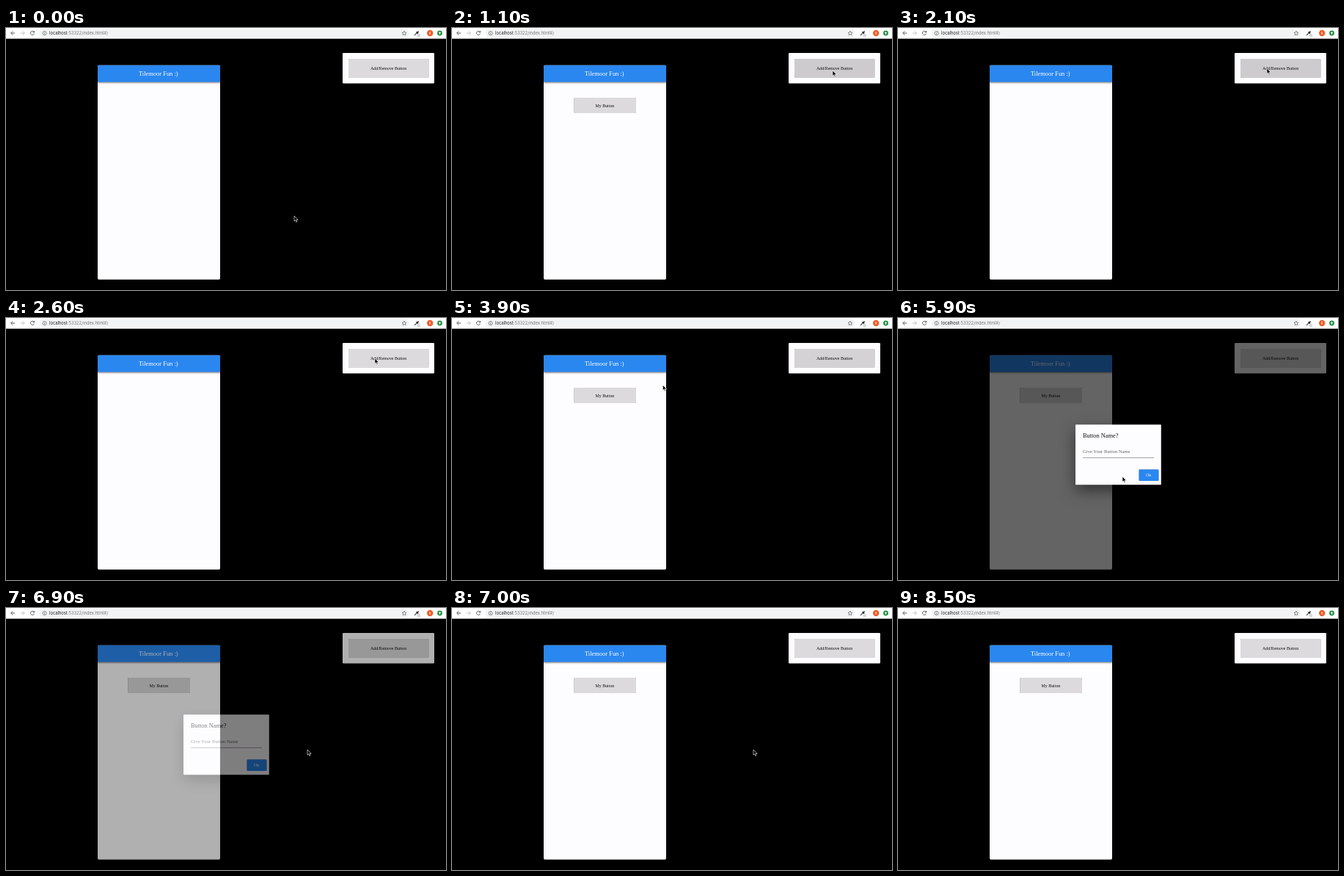
Recreate the animation shown at these times as an HTML page. Size 600 by 357 pixels, loop 9 s.

```html
<!DOCTYPE html>
<html lang="en">
<head>
<meta charset="utf-8">
<title>Add and remove a button</title>
<style>
  html, body { margin: 0; width: 100%; height: 100%; overflow: hidden; background: #000; }
  svg { display: block; width: 100vw; height: 100vh; }
  text { font: 5.93px "Liberation Serif", "Times New Roman", serif; fill: #111; }
  .mid { text-anchor: middle; }
  .url { font: 5.8px Inter, Roboto, sans-serif; fill: #777; }
  .url tspan { fill: #222; }
  .icon { fill: none; stroke: #4a4d51; stroke-width: .9; }
  .raised { filter: drop-shadow(0 .9px .7px rgba(0, 0, 0, .55)); }
  .bar { filter: drop-shadow(0 1.2px 1.2px rgba(0, 0, 0, .55)); }
  .card { filter: drop-shadow(0 8px 10px rgba(0, 0, 0, .5)); }
  .paper { fill: #fdfcfe; }
  .grey { fill: #dcdadc; }
  .blue { fill: #2a87f0; }
</style>
</head>
<body>
<svg viewBox="0 0 600 357" preserveAspectRatio="none">
  <defs>
    <clipPath id="addClip"><rect x="467" y="42" width="109.3" height="26" rx="1.3"/></clipPath>
    <clipPath id="myClip"><rect x="166.5" y="95" width="84.5" height="21" rx="1.3"/></clipPath>
  </defs>
  <rect width="600" height="357"/>

  <!-- Phone -->
  <rect class="paper" x="125" y="50.7" width="167" height="292" rx="1.6"/>
  <path class="blue bar" d="M125 73.5V52.3q0-1.6 1.6-1.6H290.4q1.6 0 1.6 1.6V73.5Z"/>
  <text class="mid" x="207.8" y="65.2" style="font-size:8.45px;fill:#fff">Tilemoor Fun :)</text>
  <g id="mine">
    <rect class="grey raised" x="166.5" y="95" width="84.5" height="21" rx="1.3"/>
    <circle id="myRipple" cx="212" cy="105" clip-path="url(#myClip)"/>
    <text class="mid" x="208.4" y="107.5">My Button</text>
  </g>

  <!-- Control panel -->
  <rect class="paper" x="459" y="34" width="125" height="41.6" rx="1.3"/>
  <rect class="grey raised" x="467" y="42" width="109.3" height="26" rx="1.3"/>
  <circle id="addRipple" cx="519" cy="57" clip-path="url(#addClip)"/>
  <text class="mid" x="521.5" y="56.9">Add/Remove Button</text>

  <!-- Dialog -->
  <g id="dialog">
    <rect y="14" width="600" height="343" opacity=".6"/>
    <rect class="paper card" x="242" y="145.2" width="116.8" height="82" rx=".8"/>
    <text x="252" y="162.6" style="font-size:8.35px">Button Name?</text>
    <text x="252" y="184" style="font-size:6.65px;fill:#666">Give Your Button Name</text>
    <path d="M252 190.4H349" stroke="#777" stroke-width=".7"/>
    <rect class="blue raised" x="328.6" y="206.6" width="26.8" height="15.3" rx="1.2"/>
    <text class="mid" x="341.7" y="216.2" style="fill:#fff">Ok</text>
  </g>

  <!-- Browser bar -->
  <rect width="600" height="14.4" fill="#fff"/>
  <rect y="14" width="600" height=".5" fill="#ccc"/>
  <rect x="45.5" y="1.6" width="504" height="11" rx="5.5" fill="#f1f3f4"/>
  <g class="icon">
    <path d="M12.2 7H6.8M9.3 4.3 6.6 7 9.3 9.7"/>
    <path d="M19.8 7h5.4M22.7 4.3 25.4 7 22.7 9.7" stroke="#bbb"/>
    <path d="M38.2 5.4A2.6 2.6 0 1 0 38.5 7.8M38.6 4V6H36.5"/>
    <circle cx="52.6" cy="7.1" r="2.6" stroke-width=".6"/>
    <path d="M52.6 6.7V8.6M52.6 5.4V6.1" stroke-width=".7"/>
    <path d="M543 4.1 543.9 6.1 546 6.3 544.4 7.7 544.9 9.8 543 8.7 541.1 9.8 541.6 7.7 540 6.3 542.1 6.1Z" stroke-width=".6"/>
    <path d="M557 10 560.5 6.5" stroke-width="1.1"/>
    <path d="M559.5 5.2 562 7.7M561 6.2 562.6 4.6" stroke="#222" stroke-width="1.5"/>
    <path d="M569.3 3V11" stroke="#ddd" stroke-width=".5"/>
  </g>
  <rect x="560.5" y="8.3" width="4.6" height="4" rx=".8" fill="#d5d7dc"/>
  <text class="url" x="59" y="9.2"><tspan>localhost</tspan>:53322/index.html#/</text>
  <circle cx="578.2" cy="7" r="4.2" fill="#ee5a24"/>
  <text class="mid" x="578.2" y="8.8" style="font:4.8px Roboto,sans-serif;fill:#fff">K</text>
  <circle cx="591.5" cy="7" r="3.4" fill="#1e8e3e"/>
  <path d="M591.5 5 593.3 7.1H592.1V8.8H590.9V7.1H589.7Z" fill="#fff"/>

  <path id="cursor" d="M0 0V7.3L1.7 5.8 2.8 8.4 4 7.9 2.9 5.4H5.2Z" stroke="#fff" stroke-width=".6"/>
</svg>
<script>
  const LOOP = 9000, STEP = 100;
  const $ = id => document.getElementById(id);
  const clamp = v => Math.max(0, Math.min(1, v));
  const smooth = v => v * v * (3 - 2 * v);

  // Pointer stops: time, x, y
  const stops = [
    [0, 393, 256], [100, 393, 256], [700, 519, 58], [1400, 519, 58],
    [1800, 503, 55], [3500, 503, 55], [4100, 212, 104], [4400, 212, 104],
    [4600, 351, 134], [5300, 350, 150], [5900, 306, 216], [6100, 310, 233],
    [6300, 333, 185], [6700, 411, 193], [7300, 411, 193], [7600, 420, 168],
    [8200, 492, 30], [8300, 507, -12], [LOOP, 507, -12]
  ];

  function pointer(t) {
    const i = stops.findIndex(s => s[0] > t);
    const [t0, x0, y0] = stops[i - 1], [t1, x1, y1] = stops[i];
    const k = smooth((t - t0) / (t1 - t0));
    return [x0 + (x1 - x0) * k, y0 + (y1 - y0) * k];
  }

  function ripple(el, age, reach) {
    el.setAttribute("r", reach * clamp((age + STEP) / 300));
    el.setAttribute("opacity", age < 0 ? 0 : .07 * clamp((700 - age) / 400));
  }

  function draw(t) {
    const click = [3400, 1900, 900].find(c => c <= t) ?? LOOP;
    ripple($("addRipple"), t - click, 70);
    ripple($("myRipple"), t - 4400, 60);

    const added = (t >= 1000 && t < 2000) || t >= 3500;
    $("mine").setAttribute("opacity", added ? 1 : 0);

    const shown = t < 6000 ? (t - 4300) / 300 : (7000 - t) / 200;
    $("dialog").setAttribute("opacity", clamp(shown));

    $("cursor").setAttribute("transform", `translate(${pointer(t)})`);
  }

  const start = performance.now();
  function tick() {
    const t = (performance.now() - start) % LOOP;
    draw(Math.floor(t / STEP) * STEP);
    requestAnimationFrame(tick);
  }
  tick();
</script>
</body>
</html>
```
